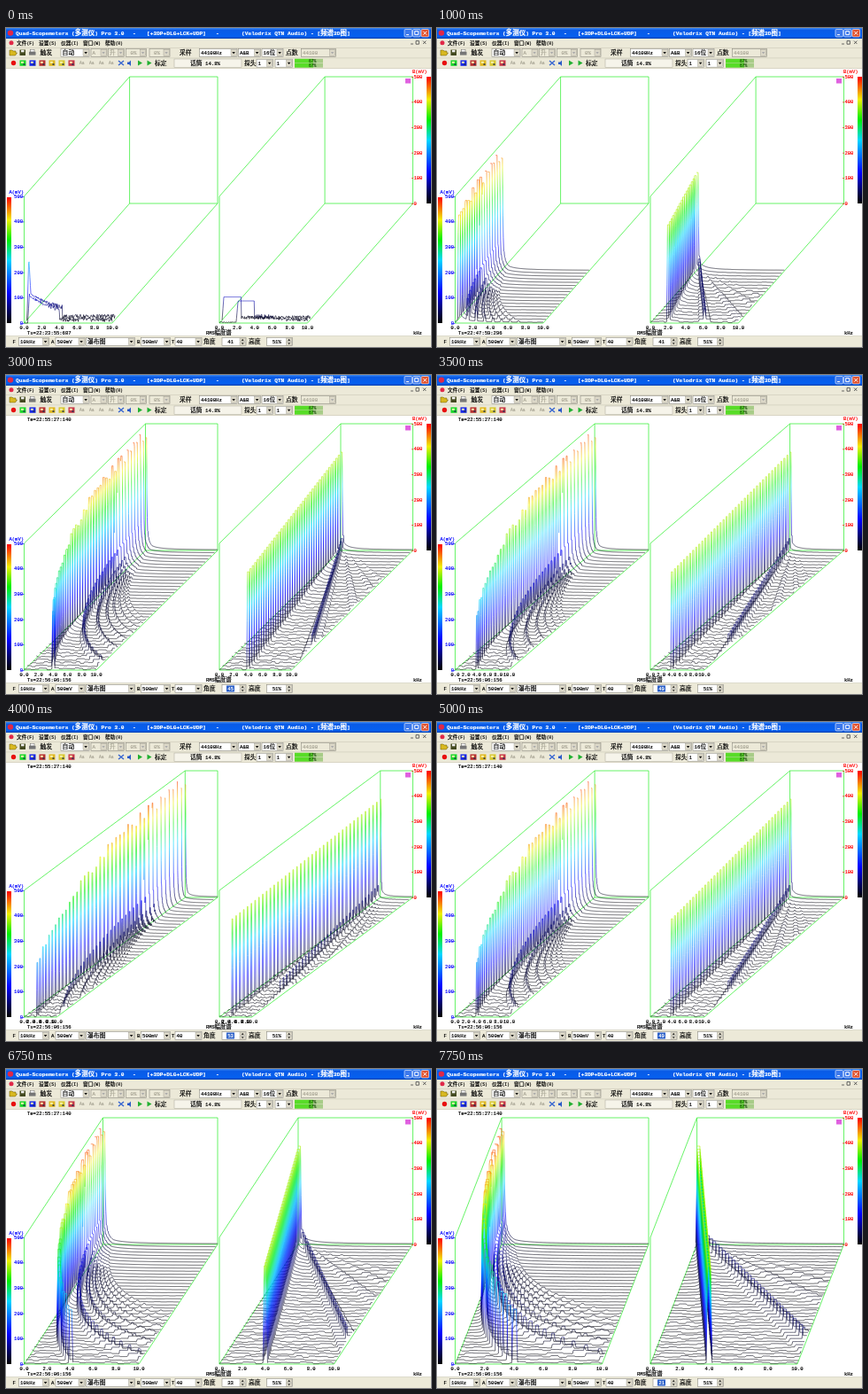
These frames come from a looping animation (480 px wide and 360 px high, 8 s). An HTML page with a canvas:

```html
<!DOCTYPE html>
<html lang="zh">
<head>
<meta charset="utf-8">
<title>3D spectrum</title>
<style>
html, body { margin: 0; width: 480px; height: 360px; overflow: hidden; background: #fff; }
canvas, svg { position: absolute; left: 0; top: 0; width: 480px; height: 360px; }
text { font-family: "Liberation Mono", "Noto Sans CJK SC", "Noto Sans CJK", monospace; white-space: pre; }
</style>
</head>
<body>
<canvas id="plot"></canvas>
<svg viewBox="0 0 480 360">
  <defs>
    <linearGradient id="heat" x1="0" y1="1" x2="0" y2="0"></linearGradient>
    <linearGradient id="bar" x1="0" y1="0" x2="0" y2="1">
      <stop offset="0" stop-color="#3f8cf3"/><stop offset=".2" stop-color="#0a5be6"/>
      <stop offset=".8" stop-color="#0560f0"/><stop offset="1" stop-color="#0340b0"/>
    </linearGradient>
  </defs>
  <g id="chrome"></g>
  <g id="live"></g>
</svg>
<script>
const STEP = 250, LOOP = 8000, ROWS = 40;
const FRONT = 333, BACK = 198, TALL = 143, SPAN = 218;
const FACE = '#ece9d8', GREEN = '#40f040', CELL = 3.4;
const HEAT = [[0, '#000'], [.1, '#000060'], [.24, '#0000ff'], [.5, '#00d8ff'],
              [.66, '#00f000'], [.82, '#f0f000'], [1, '#ff0000']];
const $ = id => document.getElementById(id);

// ---- markup helpers ----
const rect = (x, y, w, h, fill, more = '') =>
  `<rect x="${x}" y="${y}" width="${w}" height="${h}" fill="${fill}" ${more}/>`;
const path = (d, fill, more = '') => `<path d="${d}" fill="${fill}" ${more}/>`;
const dot = (x, y, r, fill) => `<circle cx="${x}" cy="${y}" r="${r}" fill="${fill}"/>`;

// cw is the width of a half-width cell; CJK glyphs take two cells
function label(x, y, s, cw = CELL, fill = '#000', more = '') {
  const runs = s.match(/[\u2e80-\u9fff]+|[^\u2e80-\u9fff]+/g).map(r =>
    r.charCodeAt(0) >= 0x2e80 ? `<tspan font-size="${cw * 2}">${r}</tspan>` : r.replace(/&/g, '&amp;'));
  return `<text x="${x}" y="${y}" font-size="${cw / .6}" fill="${fill}" stroke="${fill}" ` +
    `stroke-width=".18" ${more}>${runs.join('')}</text>`;
}
function combo(x, y, w, s, off) {
  return rect(x, y, w, 9, off ? FACE : '#fff', 'stroke="#8c8a80" stroke-width=".6"') +
    rect(x + w - 7, y + .8, 6.2, 7.4, '#dcd8c8', 'stroke="#9a978a" stroke-width=".4"') +
    path(`M${x + w - 5.6} ${y + 3.6}h3.4l-1.7 2.2z`, off ? '#aaa' : '#000') +
    label(x + 1.6, y + 6.7, s, CELL, off ? '#a8a595' : '#000');
}
function spinner(x, y, w, s, lit) {
  let out = rect(x, y, w, 9, '#fff', 'stroke="#8c8a80" stroke-width=".6"');
  if (lit) out += rect(x + 5, y + 1, 9, 7, '#2a5fc8');
  out += label(x + 6.2, y + 6.7, s, CELL, lit ? '#fff' : '#000');
  for (const d of [0, 4.5])
    out += rect(x + w - 7, y + d + .4, 6.4, 3.8, '#dcd8c8', 'stroke="#9a978a" stroke-width=".4"');
  return out + path(`M${x + w - 5.2} ${y + 3.2}h2.8l-1.4-1.6zm0 2.8h2.8l-1.4 1.6z`, '#000');
}

function buildChrome() {
  $('heat').innerHTML = HEAT.map(([o, c]) => `<stop offset="${o}" stop-color="${c}"/>`).join('');
  let h = rect(0, 0, 480, 12, 'url(#bar)') + dot(5, 5.6, 3.2, '#e02848');
  const title = (x, s) => label(x, 8.2, s, 3.72, '#fff', 'font-weight="bold"');
  h += title(11, 'Quad-Scopemeters (多测仪) Pro 3.0') + title(143, '-') + title(159, '[+3DP+DLG+LCK+UDP]') +
       title(237, '-') + title(266, '(Velodrix QTN Audio) - [频谱3D图]');
  [[450, '#3c78ec'], [459.5, '#3c78ec'], [469, '#e0502c']].forEach(([x, c], i) => {
    h += rect(x, 1.5, 8.5, 8.5, c, 'rx="1.2" stroke="#fff" stroke-width=".6"');
    h += path([`M${x + 2} 7.6h3`, `M${x + 2.2} 3.6h4v4h-4z`, `M${x + 2.2} 3.7l4 4m0-4l-4 4`][i],
              'none', 'stroke="#fff"');
  });

  h += rect(0, 12, 480, 34, FACE) + dot(6, 16.8, 2.5, '#e02848');
  ['文件(F)', '设置(S)', '仪器(I)', '窗口(W)', '帮助(H)'].forEach((s, i) => h += label(12 + i * 25, 18.8, s, 2.85));
  h += path('M457 18h3M463 14.6h3.4v3.6h-3.4zM471 14.6l3.4 3.4m0-3.4l-3.4 3.4', 'none',
            'stroke="#444" stroke-width=".8"');
  for (const y of [22, 33.7, 45.5]) h += rect(0, y, 480, .5, '#c4c0ae');

  // file and trigger bar
  h += path('M4 31v-6h3l1 1h3v2h1.5l-2 3z', '#d8b820', 'stroke="#665500" stroke-width=".5"') +
       rect(15.5, 24.5, 6.5, 6.5, '#444a20') + rect(17, 24.8, 3.5, 2.5, '#eee') +
       rect(26, 26.8, 7.5, 3.8, '#777') + rect(27.5, 24.3, 4.5, 2.6, '#fff', 'stroke="#444" stroke-width=".4"');
  h += label(38.5, 30.3, '触发') + combo(62, 23.5, 32, '自动') + combo(96, 23.5, 18, 'A', 1) +
       combo(115.5, 23.5, 18, '升', 1) + combo(135.5, 23.5, 23, ' 0%', 1) + combo(162, 23.5, 23, ' 0%', 1) +
       label(196, 30.3, '采样') + combo(218.5, 23.5, 42.5, '44100Hz') + combo(262.5, 23.5, 25, 'A&B') +
       combo(289, 23.5, 24, '16位') + label(316, 30.3, '点数') + combo(333.5, 23.5, 39, '44100', 1);

  // instrument bar
  h += dot(8.5, 39.5, 2.7, '#e81010');
  ['#18d828', '#1828e8', '#b83030', '#e0b820', '#d8c830', '#c83848'].forEach((c, i) => {
    const x = 15.5 + i * 11;
    h += rect(x, 36.4, 7, 6.4, c) + rect(x + 1.4, 37.8, 3, 2, '#f4f0b0') + rect(x + 4, 40.2, 2, 1.6, '#203050');
  });
  for (const x of [83, 94, 105, 116]) h += label(x, 41.4, 'Aa', 2.8, '#a8a595');
  h += path('M127 37l6 5m0-5l-6 5', 'none', 'stroke="#3060d0" stroke-width="1.3"') +
       path('M137 38.5h2l2-2v6.5l-2-2h-2z', '#2858c8') +
       path('M149 36.5l5 3-5 3zM159.5 36.5l5 3-5 3z', '#20b030') + label(168, 42, '标定');
  h += rect(190, 35, 76, 9.6, '#f6f4ea', 'stroke="#aaa79a" stroke-width=".5"') +
       label(208, 42, '话筒 14.8%') + label(269, 42, '探头') +
       combo(283, 35.2, 18.5, '1') + combo(304, 35.2, 19.5, '1');
  for (const y of [34.8, 39.9])
    h += rect(326, y, 32, 4.7, '#a8cc88') + rect(326, y, 21, 4.7, '#58dc28') + label(342, y + 4, '67%', 2.8, '#205010');

  // colour scales
  h += rect(1, 191, 5, 142, 'url(#heat)') + rect(475, 55, 5, 143, 'url(#heat)');
  h += label(3.5, 186.5, 'A(mV)', 3.3, '#0000ff') + label(459, 50.5, 'B(mV)', 3.3, '#ff0000') +
       rect(451, 57, 6, 5.5, '#e060e0');
  for (let v = 0; v <= 5; v++) {
    const s = v ? v + '00' : '0', d = v * TALL / 5;
    h += label(19, FRONT + 1.8 - d, s, 3.3, '#0000ff', 'text-anchor="end"') +
         rect(18.5, FRONT - d, 2, .6, '#0000ff') +
         label(460.5, BACK + 1.8 - d, s, 3.3, '#ff0000') + rect(458, BACK - d, 2, .6, '#ff0000');
  }
  h += label(226, 345.5, 'RMS幅度谱', 3.2) + label(460, 345.5, 'kHz', 3.3);

  // display bar
  h += rect(0, 347.5, 480, 12.5, FACE) + rect(0, 347.3, 480, .5, '#c4c0ae');
  h += label(7.5, 356.2, 'F') + combo(14.5, 349.5, 34, '10kHz') + label(51, 356.2, 'A') +
       combo(56, 349.5, 33, '500mV') + combo(90.5, 349.5, 55, '瀑布图') + label(148, 356.2, 'B') +
       combo(152.5, 349.5, 33, '500mV') + label(187, 356.2, 'T') + combo(191, 349.5, 30, '40') +
       label(223, 356.2, '角度') + label(274, 356.2, '高度') + spinner(294.5, 349.5, 29, '51%');
  $('chrome').innerHTML = h;
}

// ---- state at each step ----
function angleAt(n) {
  if (n <= 10) return 41;
  if (n <= 17) return 41 + 2 * (n - 10);
  if (n <= 25) return 55 - 2 * (n - 17);
  return 39 - 3 * (n - 25);
}
function stampAt(n) {
  if (n === 0) return '22:23:55:687';
  if (n >= 10) return '22:56:06:156';
  const s = 48 * 60 + 15 + (n - 8) * 4;
  return `22:${Math.floor(s / 60)}:${String(s % 60).padStart(2, '0')}:296`;
}

// ---- spectra ----
function noise(a, b) {
  const v = Math.sin(a * 12.9898 + b * 78.233) * 43758.5453;
  return v - Math.floor(v);
}
const clamp = v => Math.max(0, Math.min(1, v));
const peak = (d, w) => Math.max(0, 1 - Math.abs(d) / w);
// flat top of half-width w with steep sides
const block = (d, w) => clamp((w - Math.abs(d)) / .006);

// height in pixels at frequency f (0..1) for a tone at f0
function tone(f, f0, row, left) {
  const cell = f * 18 + row * .37, edge = Math.floor(cell);
  const mix = clamp((cell - edge) * 6);
  const steps = noise(row, edge - 1) * (1 - mix) + noise(row, edge) * mix;
  let y = .3 + steps * 2.2 * clamp(f0 * 4);
  const level = left ? v => 140 / (1 + 2.9 * v) : () => 111;
  const d = f - f0, low = Math.exp(-f0 * 8);
  y += d > 0 ? low * .62 / (d + .03) : low * 20 * Math.exp(d * 60);
  for (let k = 3; k <= (left ? 15 : 9); k += 2) {
    const top = left ? level(k * f0) * .85 / k : k === 3 ? 17 : 20 / k;
    const shelf = (left ? 9 : 8) / Math.sqrt(k) * clamp(f0 * 9);
    y = Math.max(y, top * block(f - k * f0, .016), shelf * block(f - k * f0, .012 + f0 * .28));
  }
  return Math.max(y, level(f0) * (left ? .91 + .1 * noise(row, 7) : 1) * block(d, .018));
}
// the first two sweeps, before the tone starts
function opening(f, row, left) {
  const jag = noise(Math.round(f * 200), row + 3) - .5;
  if (left) {
    const at = row ? .022 : .06, top = row ? 71 : 33;
    if (f < at) return top * peak(f - at, .02);
    if (f > .4) return 4 + jag * 5;
    return Math.max(7 + 24 * Math.exp(-(f - at) * 3) + jag * (1 + f * 13), top * peak(f - at, .04));
  }
  if (row) return f < .22 ? 26 * clamp(f * 50) : 3 + jag * 4;
  if (f > .19 && f < .4) return 25 * clamp((f - .19) * 45);
  return f < .2 ? 1 + jag : f < .62 ? 7 + jag * 6 : 4 + jag * 4;
}

const ctx = $('plot').getContext('2d');
const ratio = Math.max(1, window.devicePixelRatio || 1);
$('plot').width = 480 * ratio;
$('plot').height = 360 * ratio;
const heat = ctx.createLinearGradient(0, 0, 0, -TALL);
HEAT.forEach(([o, c]) => heat.addColorStop(o, c));

function drawBox(x, dx, w) {
  const top = FRONT - TALL, back = BACK - TALL;
  ctx.strokeStyle = GREEN;
  ctx.lineWidth = .8;
  ctx.beginPath();
  ctx.rect(x + dx, back, w, TALL);
  ctx.moveTo(x + dx, back);
  ctx.lineTo(x, top);
  ctx.lineTo(x, FRONT);
  ctx.lineTo(x + dx, BACK);
  ctx.moveTo(x, FRONT);
  ctx.lineTo(x + w, FRONT);
  ctx.lineTo(x + w + dx, BACK);
  ctx.stroke();
}

function drawRow(x, y, w, height) {
  const bins = 200;
  ctx.save();
  ctx.translate(x, y);
  ctx.beginPath();
  for (let i = 0; i <= bins; i++) ctx.lineTo(i / bins * w, -height(i / bins));
  ctx.strokeStyle = heat;
  ctx.lineWidth = .6;
  ctx.stroke();
  ctx.restore();
}

function drawChart(n, x, dx, w, left) {
  drawBox(x, dx, w);
  const count = Math.min(ROWS, 4 * n + 2), full = n >= 10;
  for (let j = count - 1; j >= 0; j--) {
    const s = j / (ROWS - 1), k = count - 1 - j;
    const age = Math.min(1, k / (full ? ROWS - 1 : 33));
    const f0 = left ? .405 * Math.exp(4.4 * (age - 1)) : (full ? .4 : .39) * (age * .975 + .025);
    drawRow(x + dx * s, FRONT - (FRONT - BACK) * s, w,
      n ? f => tone(f, f0, k, left) : f => opening(f, j, left));
  }
}

function render(n) {
  const angle = angleAt(n), dx = 137 * Math.tan(angle * Math.PI / 180), w = SPAN + .5 - dx;
  ctx.setTransform(ratio, 0, 0, ratio, 0, 0);
  ctx.fillStyle = '#fff';
  ctx.fillRect(0, 0, 480, 360);
  let h = '';
  for (const x of [20.5, 241]) {
    drawChart(n, x, dx, w, x < 100);
    for (let v = 0; v <= 10; v += 2)
      h += label(x + w * v / 10, 340, v.toFixed(1), 3.3, '#000', 'text-anchor="middle"');
  }
  h += label(24, 345.5, 'Ts=' + stampAt(n), 3.3);
  if (n >= 10) h += label(24, 52, 'Te=22:55:27:140', 3.3);
  h += spinner(244, 349.5, 27, String(angle), n > 10 && n !== 27);
  $('live').innerHTML = h;
}

buildChrome();
let shown = -1;
const start = performance.now();
function tick() {
  const n = Math.floor(((performance.now() - start) % LOOP) / STEP);
  if (n !== shown) render(shown = n);
  requestAnimationFrame(tick);
}
tick();
</script>
</body>
</html>
```
